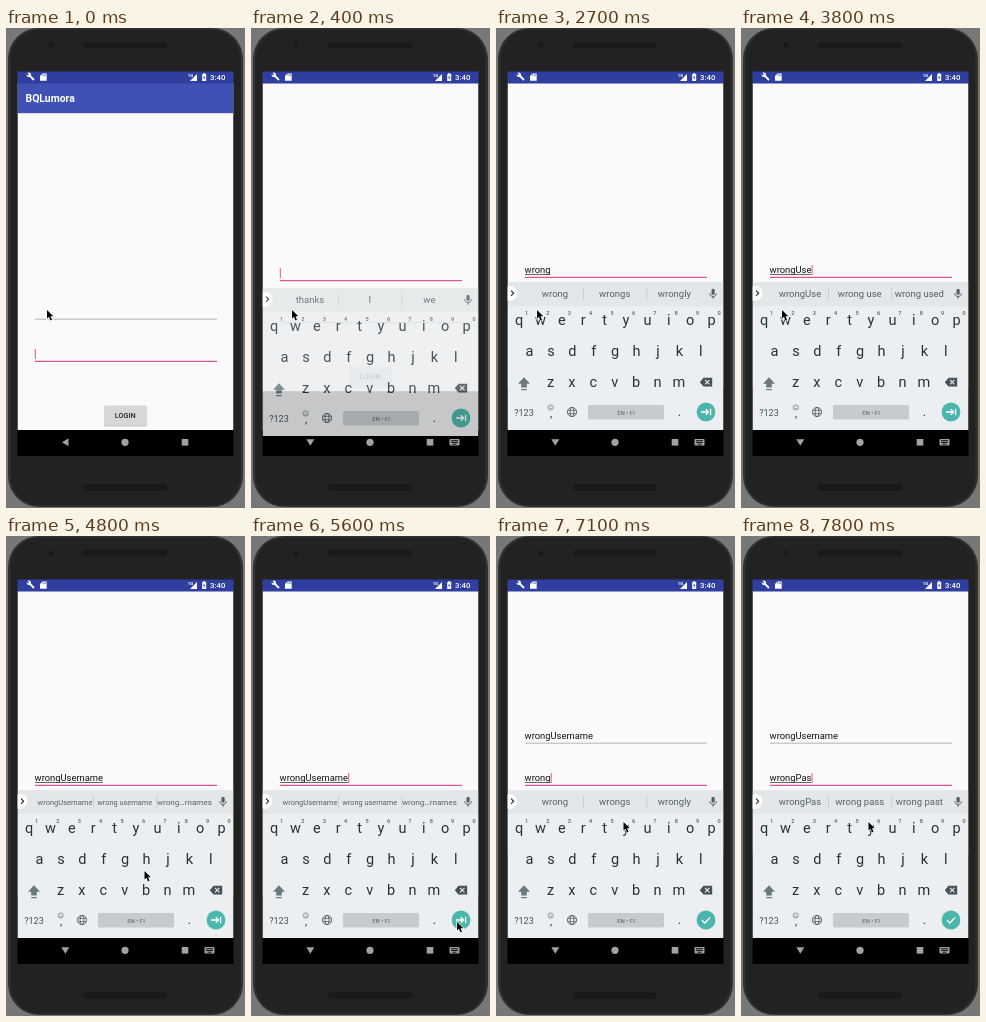
An HTML page with a canvas that plays this animation: 239 by 480 pixels, repeating every 8 s.

```html
<!DOCTYPE html>
<html lang="en">
<head>
<meta charset="utf-8">
<title>Login typing</title>
<style>
html, body { margin: 0; width: 100%; height: 100%; overflow: hidden; background: #777; }
canvas { display: block; width: 239px; height: 480px; }
</style>
</head>
<body>
<canvas id="stage" width="239" height="480"></canvas>
<script>
const screen2d = document.getElementById('stage').getContext('2d');
const layer = document.createElement('canvas');
layer.width = 239;
layer.height = 480;
const layer2d = layer.getContext('2d');
let ctx = screen2d;

const LOOP = 8000, STEP = 100;
const LEFT = 11.5, WIDE = 216;
const FONT = 'Roboto, "Open Sans", sans-serif';
const INK = '#263238', PINK = '#e0558f', TEAL = '#4db6ac';
const FOCUS_USER = 100, KEYBOARD_IN = 200, FOCUS_PASS = 5700;

// Time of each key press
const userKeys = [1600, 1800, 1900, 2000, 2100, 3000, 3400, 3700, 3900, 4000, 4100, 4200, 4300];
const passKeys = [6500, 6700, 6900, 7000, 7100, 7300, 7600, 7800];
const mousePath = [[4600, 41, 282], [4800, 138.5, 335], [5200, 206, 386], [5700, 206, 386], [6100, 127.5, 286]];

const hints = {
  '': ['thanks', 'I', 'we'],
  w: ['w', 'we', 'what'],
  wr: ['wr', 'wrong', 'write'],
  wro: ['wro', 'wrong', 'wrote'],
  wron: ['wron', 'wrong', 'wrongly'],
  wrong: ['wrong', 'wrongs', 'wrongly'],
  wrongU: ['wrongU', 'wrong U', 'wrong up'],
  wrongUs: ['wrongUs', 'wrong us', 'wrong use'],
  wrongUse: ['wrongUse', 'wrong use', 'wrong used'],
  wrongUsername: ['wrongUsername', 'wrong username', 'wrong…rnames'],
  wrongP: ['wrongP', 'wrong P', 'wrong one'],
  wrongPa: ['wrongPa', 'wrong pa', 'wrong part'],
  wrongPas: ['wrongPas', 'wrong pass', 'wrong past']
};
const hintsFor = s => hints[s] || [s, s.replace('U', ' u'), 'wrong user'];

function rect(x, y, w, h, color, r = 0) {
  ctx.fillStyle = color;
  ctx.beginPath();
  ctx.roundRect(x, y, w, h, r);
  ctx.fill();
}

function disc(x, y, r, color) {
  ctx.fillStyle = color;
  ctx.beginPath();
  ctx.arc(x, y, r, 0, 7);
  ctx.fill();
}

function path(d, color, width, x = 0, y = 0) {
  const p = new Path2D(d);
  ctx.save();
  ctx.translate(x, y);
  if (width) {
    ctx.strokeStyle = color;
    ctx.lineWidth = width;
    ctx.stroke(p);
  } else {
    ctx.fillStyle = color;
    ctx.fill(p);
  }
  ctx.restore();
}

function text(s, x, y, size, color, align = 'center', weight = 400) {
  ctx.font = `${weight} ${size}px ${FONT}`;
  ctx.textAlign = align;
  ctx.fillStyle = color;
  ctx.fillText(s, x, y);
  return ctx.measureText(s).width;
}

function clip(x, y, w, h, draw) {
  ctx.save();
  ctx.beginPath();
  ctx.rect(x, y, w, h);
  ctx.clip();
  draw();
  ctx.restore();
}

const easeOut = (t, start, length, power) =>
  1 - (1 - Math.min(1, Math.max(0, (t - start) / length))) ** power;

const typed = (word, keys, t) => word.slice(0, keys.filter(k => k <= t).length);

function drawPhone() {
  rect(0, 0, 239, 480, '#777');
  rect(2, 0, 235, 479, '#303030', 31);
  rect(4.5, 1.5, 230, 476, '#222', 29);
  rect(77, 14, 84, 6.5, '#191919', 3.2);
  rect(77, 456, 84, 6.5, '#191919', 3.2);
  disc(45, 17, 2.5, '#191919');
}

function drawStatus() {
  rect(LEFT, 43.5, WIDE, 12, '#303f9f');
  path('M22.5 46.5L28 52', '#fff', 1.8);
  disc(22.8, 46.8, 2.2, '#fff');
  path('M20 44.5L22.5 47', '#303f9f', 1.4);
  path('M36.5 45.5h4.2v7.2h-6.7v-4.7z', '#fff');
  path('M36.8 46.3v1.8M38.3 46.3v1.8M39.7 46.3v1.8', '#303f9f', .6);
  path('M191 46v7h-7z', '#fff');
  text('1G', 181.7, 49.2, 4.3, '#fff', 'left', 700);
  rect(196.2, 46, 4, 7, '#fff', .6);
  rect(197.2, 45.2, 2, 1, '#fff');
  path('M198.5 47l-1.4 2.8h1l-.3 2.1 1.5-3h-1z', '#303f9f');
  text('3:40', 204, 52.4, 7.8, '#fff', 'left', 500);
}

function drawField(line, value, focused, caret) {
  rect(29, line - .2, 182, focused ? 1.1 : .8, focused ? PINK : '#9c9c9c');
  const width = text(value, 28.6, line - 4, 9.4, '#111', 'left');
  if (!focused) return;
  if (value) rect(29, line - 2.8, width - .5, .8, '#333');
  if (caret) rect(28.8 + width, line - 12, 1, 10, PINK);
}

function drawApp(pan, user, pass, focus, caret) {
  clip(LEFT, 55, WIDE, 347, () => {
    rect(LEFT, 55, WIDE, 347, '#fafafa');
    ctx.translate(0, -pan);
    rect(LEFT, 85, WIDE, 1.2, '#dcdcdc');
    rect(LEFT, 55, WIDE, 30, '#3f51b5');
    text('BQLumora', 19.5, 74, 10.4, '#fff', 'left', 600);
    drawField(291, user, focus === 1, caret);
    drawField(333, pass, focus === 2, caret);
    rect(98, 378, 43, 20.5, '#c4c5c5', 1.5);
    rect(98, 377.5, 43, 20, '#d6d7d7', 1.5);
    text('LOGIN', 119.3, 390, 7.3, '#222', 'center', 500);
    if (pan) rect(LEFT, 402, WIDE, 90, '#000');
  });
}

function drawHints(words) {
  rect(LEFT, 254, WIDE, 24, '#e4e7e9');
  disc(14, 266, 7.5, '#d3d8da');
  disc(14, 265.4, 7.5, '#fff');
  path('M15 262.7l2.6 2.6-2.6 2.6', INK, 1.2);
  rect(87, 260, .8, 12, '#c5cbce');
  rect(150.5, 260, .8, 12, '#c5cbce');
  words.forEach((word, i) => {
    ctx.font = `400 9.5px ${FONT}`;
    const long = ctx.measureText(word).width > 55;
    ctx.fontStretch = long ? 'condensed' : 'normal';
    const size = 9.5 * Math.min(1, 55 / ctx.measureText(word).width);
    text(word, 59 + 59.7 * i, 269, size, '#546066');
  });
  ctx.fontStretch = 'normal';
  rect(215.5, 260.8, 3.2, 6, '#546066', 1.6);
  path('M213.8 265.2c0 4.4 6.6 4.4 6.6 0M217.1 268.4v2.4', '#546066', 1);
}

function drawKeys(done) {
  [['qwertyuiop', 23, 296.5], ['asdfghjkl', 33.5, 327.5], ['zxcvbnm', 54.5, 358.5]].forEach(([row, x, y]) =>
    [...row].forEach((key, i) => text(key, x + 21.4 * i, y, 14.5, INK)));
  [...'1234567890'].forEach((n, i) => text(n, 30.5 + 21.4 * i, 286.5, 5.6, '#546066', 'center', 500));

  path('M28 349.3l6 6.5h-3.2v3.6h-5.6v-3.6H22z', '#6b797f');
  rect(25.2, 361, 5.6, 1.3, '#6b797f');
  path('M207.5 349.8h8.7v8.7h-8.7l-3.7-4.35z', '#455157');
  path('M209 351.9l4.5 4.5M213.5 351.9l-4.5 4.5', '#eceff1', 1.1);

  text('?123', 28, 387.5, 9, '#455157');
  ctx.strokeStyle = '#6b797f';
  ctx.lineWidth = .7;
  ctx.beginPath();
  ctx.arc(54.7, 379.5, 2.6, 0, 7);
  ctx.stroke();
  path('M53.4 380.2q1.3 1.4 2.6 0M53.7 378.4v.8M55.7 378.4v.8', '#6b797f', .6);
  text(',', 55, 388.5, 11, INK);
  ctx.strokeStyle = '#455157';
  ctx.lineWidth = .8;
  ctx.beginPath();
  ctx.arc(76, 384, 4.6, 0, 7);
  ctx.moveTo(78, 384);
  ctx.ellipse(76, 384, 2, 4.6, 0, 0, 7);
  ctx.stroke();
  path('M71.8 382.3h8.4M71.8 385.7h8.4', '#455157', .7);
  rect(92, 377, 76, 14.5, '#c6ccce', 1.5);
  text('EN • FI', 130, 386.5, 6, '#546066');
  text('.', 183.5, 388, 13, INK);
  disc(210, 384, 9.4, TEAL);
  path(done ? 'M206 384.2l2.8 2.8 5.4-5.6' : 'M205 384h7.5M209.8 381.2l2.8 2.8-2.8 2.8M214.6 380.8v6.4', '#fff', 1.3);
}

// The keyboard fades in as one sheet, so it is painted on its own layer first.
function drawKeyboard(shown, words, done) {
  if (!shown) return;
  ctx = layer2d;
  ctx.clearRect(0, 0, 239, 480);
  clip(LEFT, 254, WIDE, 148, () => {
    rect(LEFT, 278, WIDE, 124, '#eceff1');
    drawHints(words);
    drawKeys(done);
  });
  ctx = screen2d;
  clip(LEFT, 55, WIDE, 373, () => {
    ctx.globalAlpha = 1 - .9 * (1 - shown);
    ctx.drawImage(layer, 0, Math.round(31 * (1 - shown)));
  });
}

function drawNav(open) {
  const gray = '#a2a2a2';
  path(open ? 'M55.3 411.3h8l-4 6.5z' : 'M62.5 410.3v8l-6.5-4z', gray);
  disc(119, 414.3, 3.6, gray);
  rect(175.7, 411, 6.6, 6.6, gray);
  if (!open) return;
  rect(198.5, 411, 10, 6.6, gray, .8);
  path('M200 412.7h7M200 414.4h7M201.5 416.2h4', '#000', .9);
}

function drawMouse(t) {
  let [, x, y] = mousePath[t < 4600 ? 0 : 4];
  mousePath.slice(1).forEach(([end, bx, by], i) => {
    const [start, ax, ay] = mousePath[i];
    if (t < start || t >= end) return;
    const p = (t - start) / (end - start);
    x = ax + (bx - ax) * p;
    y = ay + (by - ay) * p;
  });
  const arrow = 'M0 0v8.6l2-1.8 1.5 3.6 1.5-.7-1.5-3.4h2.8z';
  path(arrow, '#fff', 1.2, x, y);
  path(arrow, '#000', 0, x, y);
}

function draw(t) {
  const user = typed('wrongUsername', userKeys, t);
  const pass = typed('wrongPas', passKeys, t);
  const focus = t >= FOCUS_USER && t < FOCUS_PASS ? 1 : 2;
  const lastEvent = Math.max(0, ...[FOCUS_USER, FOCUS_PASS, ...userKeys, ...passKeys].filter(k => k <= t));
  const caret = (t - lastEvent) % 1000 < 500;
  const pan = 42 * (easeOut(t, KEYBOARD_IN, 350, 3) + easeOut(t, FOCUS_PASS, 350, 3));

  drawPhone();
  rect(LEFT, 402, WIDE, 26, '#000');
  drawApp(pan, user, pass, focus, caret);
  drawStatus();
  drawKeyboard(easeOut(t, KEYBOARD_IN, 350, 2), hintsFor(focus === 1 ? user : pass), t >= FOCUS_PASS);
  drawNav(t >= KEYBOARD_IN);
  drawMouse(t);
}

const began = performance.now();
function frame() {
  const t = (performance.now() - began) % LOOP;
  draw(Math.floor(t / STEP) * STEP);
  requestAnimationFrame(frame);
}
frame();
</script>
</body>
</html>
```
